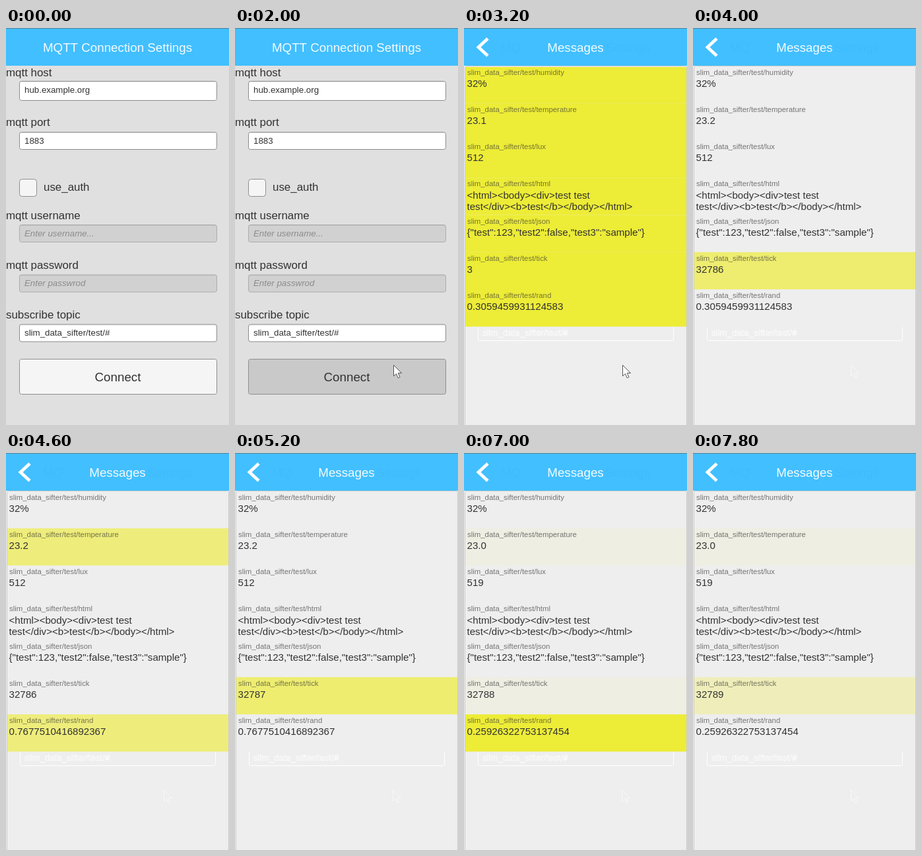
Recreate the animation shown at these times as an HTML page with a canvas. Size 338 px wide and 600 px high, loop 8 s.

```html
<!DOCTYPE html>
<html lang="en">
<head>
<meta charset="utf-8">
<title>Message client</title>
<style>
  html, body { margin: 0; width: 100%; height: 100%; overflow: hidden; background: #e0e0e0; }
  canvas { display: block; width: 338px; height: 600px; }
</style>
</head>
<body>
<canvas id="stage"></canvas>
<script>
const W = 338, H = 600, LOOP = 8000, STEP = 200;
const FONT = '"Liberation Sans", Arial, sans-serif';
const BG = '#eeeeee', YELLOW = '238,237,48';
const ROW_TOP = 57.5, ROW_H = 56.25;
const FADE = 525;
const TOPIC = 'slim_data_sifter/test/';
const TITLE = 'MQTT Connection Settings';

const canvas = document.getElementById('stage');
const ctx = canvas.getContext('2d');
const ratio = window.devicePixelRatio || 1;
canvas.width = W * ratio;
canvas.height = H * ratio;
ctx.scale(ratio, ratio);

// Updates are [time, value, tint left after the fade]; a row shows from its first update on.
const FIRST = 3180;
const rows = [
  { name: 'humidity', updates: [[FIRST, '32%']] },
  { name: 'temperature', updates: [[FIRST, '23.1'], [3380, '23.2'], [4390, '23.2'], [5780, '23.1'], [6220, '23.0', 0.06]] },
  { name: 'lux', updates: [[FIRST, '512'], [6220, '519']] },
  { name: 'html', updates: [[FIRST, '<html><body><div>test test\ntest</div><b>test</b></body></html>']] },
  { name: 'json', updates: [[FIRST, '{"test":123,"test2":false,"test3":"sample"}']] },
  { name: 'tick', updates: [[FIRST, '3'], [3820, '32786'], [5020, '32787'], [6220, '32788', 0.06], [7420, '32789']] },
  { name: 'rand', updates: [[FIRST, '0.3059459931124583'], [4390, '0.7677510416892367'],
    [5780, '0.4182906617350928'], [6980, '0.25926322753137454']] }
];

function text(str, x, y, size, color, align = 'left', style = '') {
  ctx.font = `${style} ${size}px ${FONT}`;
  ctx.fillStyle = color;
  ctx.textAlign = align;
  ctx.fillText(str, x, y);
}

function box(x, y, w, h, fill, stroke, radius = 3) {
  ctx.beginPath();
  ctx.roundRect(x + 0.5, y + 0.5, w - 1, h - 1, radius);
  ctx.fillStyle = fill;
  ctx.fill();
  ctx.strokeStyle = stroke;
  ctx.lineWidth = 1;
  ctx.stroke();
}

function path(points, x, y) {
  ctx.beginPath();
  points.forEach(([px, py]) => ctx.lineTo(x + px, y + py));
}

function clipped(rects, draw) {
  ctx.save();
  ctx.beginPath();
  rects.forEach(r => ctx.rect(...r));
  ctx.clip();
  draw();
  ctx.restore();
}

function header(title) {
  ctx.fillStyle = '#42bfff';
  ctx.fillRect(0, 0, W, 57);
  ctx.fillStyle = '#5d7f93';
  ctx.fillRect(0, 0, W, 1);
  text(title, 169, 36, 18.75, '#f4fbff', 'center');
}

function cursor(x, y, ghost) {
  path([[0, 0], [0, 16.5], [4, 13], [6.6, 19.3], [9.4, 18.2], [6.8, 12], [12, 12]], x, y);
  ctx.closePath();
  ctx.lineWidth = 1;
  ctx.lineJoin = 'miter';
  ctx.fillStyle = ghost ? BG : '#ffffff';
  ctx.strokeStyle = ghost ? 'rgba(255,255,255,.6)' : '#555555';
  ctx.fill();
  ctx.stroke();
}

function field(label, labelY, y, h, value, disabled) {
  text(label, 0, labelY, 16.9, '#323232');
  box(20, y, 300, h, disabled ? '#d1d1d1' : '#ffffff', disabled ? '#acacac' : '#8c8c8c');
  ctx.fillStyle = 'rgba(0,0,0,.08)';
  ctx.fillRect(22, y + 1, 296, 1);
  text(value, 28, y + 17.6, 13.3, disabled ? '#8b8b8b' : '#323232', 'left', disabled ? 'italic' : '');
}

function settings(t) {
  ctx.fillStyle = '#e0e0e0';
  ctx.fillRect(0, 0, W, H);
  header(TITLE);
  field('mqtt host', 72.5, 80, 30, 'hub.example.org');
  field('mqtt port', 147.5, 157, 27, '1883');
  box(20, 228, 27, 27, '#f5f5f5', '#8f8f8f', 4);
  text('use_auth', 57, 246, 16.9, '#323232');
  field('mqtt username', 288.5, 297, 27, 'Enter username...', true);
  field('mqtt password', 363.5, 372.5, 27, 'Enter passwrod', true);
  field('subscribe topic', 438.5, 447.5, 27, TOPIC + '#');
  box(20, 500, 300, 54, t < 2000 ? '#f5f5f5' : '#c9c9c9', '#8f8f8f');
  text('Connect', 169.5, 533.5, 18.75, '#323232', 'center');
  if (t >= 1200) cursor(t < 1400 ? 239.5 : 240.5, 509.5);
}

// Faint remains of the settings page behind the list.
function remains() {
  clipped([[56, 18, 32, 26], [214, 18, 70, 26]], () =>
    text(TITLE, 169, 36, 18.75, 'rgba(30,150,220,.08)', 'center'));
  clipped([[0, 452, W, 40]], () => {
    box(21, 448, 297, 25, 'transparent', '#ffffff', 2);
    ctx.font = `13.3px ${FONT}`;
    ctx.textAlign = 'left';
    ctx.lineWidth = 0.5;
    ctx.strokeText(TOPIC + '#', 28, 465);
  });
}

function drawRow(row, i, t) {
  const update = row.updates.filter(u => u[0] <= t).pop();
  if (!update) return;
  const [start, value, rest = 0] = update;
  const y = ROW_TOP + i * ROW_H;
  const tint = Math.max(rest, 1 - (t - start) / FADE);
  if (tint > 0) {
    ctx.fillStyle = `rgba(${YELLOW},${tint})`;
    ctx.fillRect(0, y, W, ROW_H);
  }
  text(TOPIC + row.name, 5, y + 13, 11.4, 'rgba(50,50,50,.65)');
  value.split('\n').forEach((line, n) => text(line, 4.5, y + 31.3 + n * 17, 15.1, '#323232'));
}

function messages(t) {
  ctx.fillStyle = BG;
  ctx.fillRect(0, 0, W, H);
  header('Messages');
  path([[14, 0], [0, 13], [14, 26]], 22, 16);
  ctx.strokeStyle = '#ffffff';
  ctx.lineWidth = 4.8;
  ctx.lineJoin = 'miter';
  ctx.stroke();
  remains();
  box(1, 57, W - 1, H - 50, 'transparent', '#cccccc', 3);
  clipped([[2, 59, W - 3, H - 59]], () => rows.forEach((row, i) => drawRow(row, i, t)));
  const gone = t >= 3600;
  cursor(gone ? 239.5 : 240.5, 509.5, gone);
}

function frame(now) {
  const t = Math.floor((now % LOOP) / STEP) * STEP;
  ctx.clearRect(0, 0, W, H);
  (t < 2400 ? settings : messages)(t);
}

function loop() {
  frame(performance.now() - begin);
  requestAnimationFrame(loop);
}

const begin = performance.now();
loop();
</script>
</body>
</html>
```
